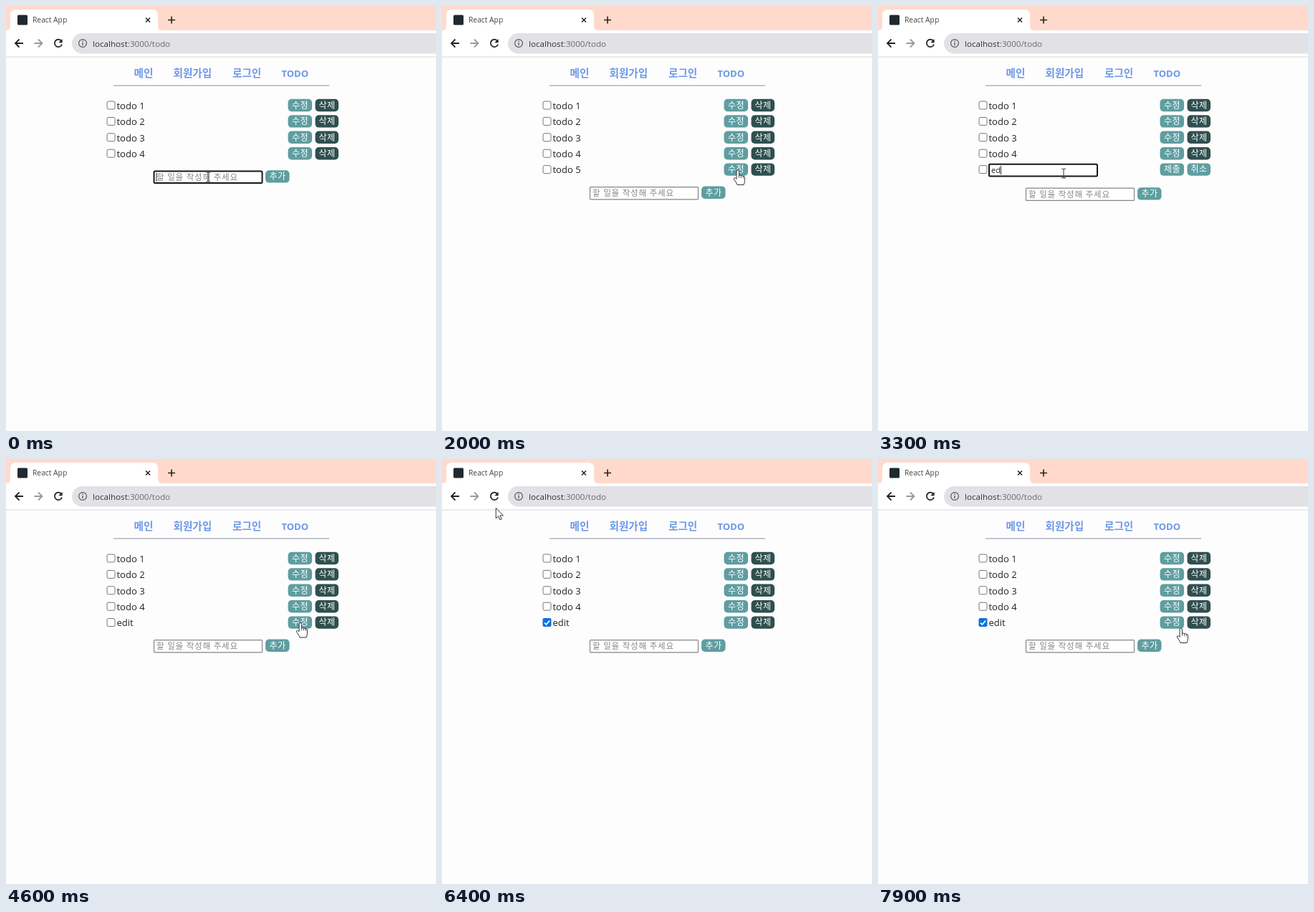
These frames come from a looping animation (600 by 593 pixels, 8000 ms). An HTML page:

```html
<!DOCTYPE html>
<html lang="ko">
<head>
<meta charset="utf-8">
<title>Todo</title>
<style>
  html, body { margin: 0; width: 100%; height: 100%; overflow: hidden; background: #fefdfe; }
  svg { display: block; }
  text { font-family: 'Open Sans', 'Noto Sans CJK KR', 'Noto Sans CJK', 'Noto Sans', sans-serif; white-space: pre; }
  .nav { font-size: 14.6px; font-weight: 700; fill: #6c98e4; }
  .nav.latin { font-size: 13px; }
  .item { font-size: 13px; fill: #222; }
  .btn { font-size: 12px; letter-spacing: .3px; fill: #fff; text-anchor: middle; }
  .hint { font-size: 11.5px; letter-spacing: .8px; fill: #858585; }
  .typed { font-size: 11px; fill: #222; }
</style>
</head>
<body>
<svg width="600" height="593" viewBox="0 0 600 593">
  <rect width="600" height="593" fill="#fefdfe"/>
  <rect width="600" height="34" fill="#ffdacc"/>
  <path d="M0 34Q6 34 6 28V13Q6 5 14 5H204Q212 5 212 13V28Q212 34 218 34Z" fill="#fff"/>
  <rect y="34" width="600" height="37" fill="#fff"/>
  <rect y="70.5" width="600" height="1" fill="#d9d8dc"/>
  <text x="37" y="23" font-size="10.3" fill="#444">React App</text>
  <path d="M195 16.500l6 6m0-6l-6 6" stroke="#222" stroke-width="1.5"/>
  <path d="M226 19.500h10m-5-5v10" stroke="#222" stroke-width="1.6"/>
  <g id="hover"><circle cx="73" cy="52" r="12" fill="#e6e5e9"/></g>
  <g fill="none" stroke-width="1.8">
    <path d="M24 52H13m5.500-5.500L13 52l5.500 5.500" stroke="#222"/>
    <path d="M39.500 52h11m-5.500-5.500l5.500 5.500-5.500 5.500" stroke="#999"/>
    <path d="M77 48.500A5.200 5.200 0 1 0 78 53.500" stroke="#222"/>
  </g>
  <path d="M78.600 46v5.300h-5.300z" fill="#222"/>
  <rect x="92" y="38" width="530" height="28.500" rx="14.200" fill="#e2e1e6"/>
  <circle cx="107" cy="52" r="5.400" fill="none" stroke="#555" stroke-width="1.200"/>
  <path d="M107 51v4m0-6.500v1.400" stroke="#555" stroke-width="1.300"/>
  <text x="121" y="56.500" font-size="11.650" fill="#333">localhost<tspan fill="#6b6b6f">:3000/todo</tspan></text>
  <text class="nav" x="178.500" y="98.500">메인</text>
  <text class="nav" x="233.500" y="98.500">회원가입</text>
  <text class="nav" x="316" y="98.500">로그인</text>
  <text class="nav latin" x="384.500" y="98.500">TODO</text>
  <rect x="150" y="110.500" width="301" height="1" fill="#8b90a0"/>
  <g id="icon"></g>
  <g id="page"></g>
  <g id="pointer"></g>
</svg>
<script>
const LOOP = 8000, STEP = 100;
const TEAL = '#5f9ea0', SLATE = '#2f4f4f';
const $ = id => document.getElementById(id);
const pen = document.createElement('canvas').getContext('2d');
pen.font = "11px 'Open Sans', 'Noto Sans', sans-serif";

// Moments at which the page state changes
const ADD = 1600, EDIT = 2200, FOCUS = 2700, SUBMIT = 4400, CHECK = 5700, BLANK = 6800, LOADED = 7300;

// Pointer stops: time, x, y
const stops = [
  [0, 282, 238.5], [1000, 282, 238.5], [1300, 376, 239], [1600, 376, 239],
  [1900, 413, 229.5], [2200, 413, 229.5], [2700, 259, 233.5], [3600, 259, 233.5],
  [4100, 411, 229], [4700, 411, 229], [5400, 154, 229], [5600, 148, 228],
  [5800, 148, 228], [6500, 71, 59], [7300, 71, 59], [7900, 423, 236.5]
];

// Field contents: time of the keystroke, text after it
const addKeys = [[0, ''], [300, 't'], [400, 'to'], [500, 'tod'], [600, 'todo'], [700, 'todo '], [900, 'todo 5']];
const editKeys = [[0, 'todo 5'], [2800, 'todo'], [2900, 'to'], [3000, ''], [3100, 'e'], [3200, 'ed'], [3400, 'edi'], [3600, 'edit']];

const last = (list, t) => list.filter(k => k[0] <= t).pop();
const ease = u => u * u * (3 - 2 * u);

function pointerAt(t) {
  const i = stops.findIndex(s => s[0] > t);
  if (i < 0) return stops[stops.length - 1].slice(1);
  const [t0, x0, y0] = stops[i - 1], [t1, x1, y1] = stops[i];
  const u = ease((t - t0) / (t1 - t0));
  return [x0 + (x1 - x0) * u, y0 + (y1 - y0) * u];
}

const text = (cls, x, y, s) => `<text class="${cls}" x="${x}" y="${y}">${s}</text>`;

function button(x, cy, label, fill, w = 33.5) {
  zones.push(['hand', x, cy - 9, w, 18]);
  return `<rect x="${x}" y="${cy - 8.7}" width="${w}" height="17.400" rx="5" fill="${fill}"/>` +
    text('btn', x + w / 2 + .2, cy + 4.3, label);
}

function checkbox(cy, on) {
  const y = cy - 5.5;
  return on
    ? `<rect x="140.500" y="${y - .5}" width="12" height="12" rx="2" fill="#0b72e0"/>
       <path d="M143 ${cy + .5}l2.500 2.500 4.500-5.500" fill="none" stroke="#fff" stroke-width="1.700"/>`
    : `<rect x="141" y="${y}" width="11" height="11" rx="2" fill="#fff" stroke="#767676"/>`;
}

function field(x, cy, focused, [since, value], t, hint) {
  const w = 151;
  zones.push(['beam', x, cy - 9, w, 18]);
  let s = focused
    ? `<rect x="${x}" y="${cy - 8.3}" width="${w}" height="16.600" rx="1.500" fill="#fff" stroke="#15161c" stroke-width="2"/>`
    : `<rect x="${x}" y="${cy - 8.6}" width="${w}" height="17.200" rx="1" fill="#fff" stroke="#85858a" stroke-width="1.200"/>`;
  const tx = x + 3;
  s += value ? text('typed', tx, cy + 4, value) : hint ? text('hint', tx + .5, cy + 3.8, hint) : '';
  if (focused && value.startsWith('todo ')) {
    s += `<path d="M${tx} ${cy + 6.3}${'l1.500 -1.300l1.500 1.300'.repeat(8)}" fill="none" stroke="#dc4a4a" stroke-width=".9"/>`;
  }
  if (focused && (t - since) % 1060 < 530) {
    s += `<rect x="${tx + pen.measureText(value).width}" y="${cy - 6}" width="1" height="12" fill="#222"/>`;
  }
  return s;
}

let zones = [];

function page(t) {
  const blank = t >= BLANK && t < LOADED;
  const editing = t >= EDIT && t < SUBMIT;
  const count = blank ? 0 : t < ADD ? 4 : 5;
  let s = '';
  for (let i = 0; i < count; i++) {
    const cy = 138.5 + i * 22.4, fifth = i === 4, open = fifth && editing;
    s += checkbox(cy, fifth && t >= CHECK);
    s += open
      ? field(155, cy + 1, t >= FOCUS, last(editKeys, t), t)
      : text('item', 154.5, cy + 5.3, fifth && t >= SUBMIT ? 'edit' : 'todo ' + (i + 1));
    s += button(393.5, cy, open ? '제출' : '수정', TEAL);
    s += button(431.5, cy, open ? '취소' : '삭제', open ? TEAL : SLATE, 32.5);
  }
  const y = blank ? 139.5 : 149.2 + count * 22.4 + (editing ? 1.6 : 0);
  const typing = t < ADD;
  s += field(206.5, y, typing, typing ? last(addKeys, t) : [0, ''], t, '할 일을 작성해 주세요');
  return s + button(362, y - .9, '추가', TEAL);
}

const shapes = {
  arrow: '<path d="M0 0V14.500L3.400 11.400 5.800 16.500 8 15.500 5.700 10.600H10.200Z" fill="#fff" stroke="#333"/>',
  hand: '<path d="M-2 1.500Q-2-.5-.3-.5T1.400 1.500V7Q3 5.800 4.400 7.400 6 6.400 7.200 8 9.400 7.400 9.400 10V14Q9.400 17 8 20H-1Q-2 17-5.500 12.500-6.300 10.500-4.700 10.200-3.400 10.200-2 12Z" fill="#fff" stroke="#333"/><path d="M1.400 7v3.500M4.400 7.400v3.300M7.200 8v3" stroke="#333" stroke-width=".8"/>',
  beam: '<path d="M-3-6.500Q0-6.500 0-5.500 0-6.500 3-6.500M0-5.500V5.500M-3 6.500Q0 6.500 0 5.500 0 6.500 3 6.500" fill="none" stroke="#444" stroke-width="1.100"/>'
};

function draw(t) {
  zones = [];
  $('page').innerHTML = page(t);
  const [x, y] = pointerAt(t);
  const hit = zones.find(([, zx, zy, w, h]) => x >= zx && x <= zx + w && y >= zy && y <= zy + h);
  $('pointer').innerHTML = shapes[hit ? hit[0] : 'arrow'];
  $('pointer').setAttribute('transform', `translate(${x} ${y})`);
  $('hover').style.display = Math.hypot(x - 73, y - 52) < 13 ? '' : 'none';
  $('icon').innerHTML = t >= BLANK && t < LOADED
    ? '<circle cx="23" cy="19.500" r="6" fill="#26383f"/>'
    : '<rect x="16" y="12.500" width="14" height="14" rx="1.500" fill="#20292f"/>';
}

let shown = -1;
function tick() {
  const t = Math.floor(performance.now() % LOOP / STEP) * STEP;
  if (t !== shown) draw(shown = t);
  requestAnimationFrame(tick);
}
tick();
</script>
</body>
</html>
```
